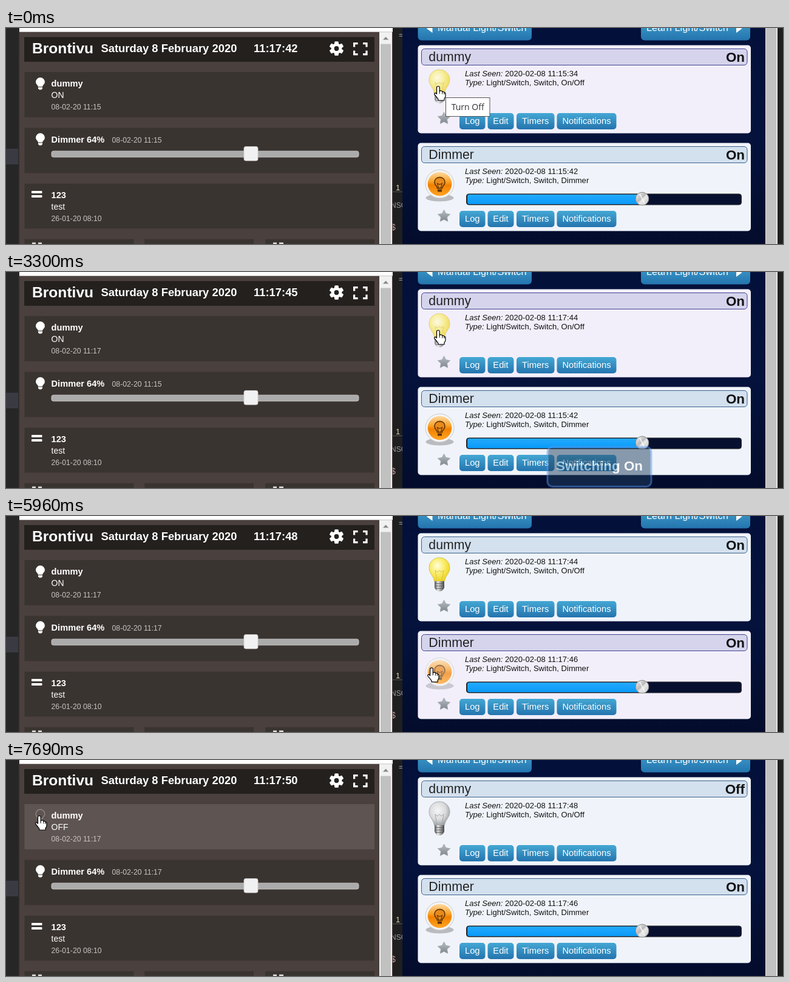
These frames come from a looping animation (1280 by 358 pixels, 8 s). An HTML page:

```html
<!DOCTYPE html>
<html lang="en">
<head>
<meta charset="utf-8">
<title>Switch dashboard</title>
<style>
html, body { margin: 0; width: 100%; height: 100%; overflow: hidden; background: #1e1e1e; }
svg { display: block; width: 100vw; height: 100vh; font-family: "Liberation Sans", Arial, sans-serif; }
.b { font-weight: bold; }
.m { text-anchor: middle; }
.e { text-anchor: end; }
.tip { font-family: "Open Sans", "Noto Sans", sans-serif; }
</style>
</head>
<body>
<svg id="stage" viewBox="0 0 1280 358" xmlns="http://www.w3.org/2000/svg"></svg>
<script>
const LOOP = 8000;

const rect = (x, y, w, h, fill, more = '') =>
  `<rect x="${x}" y="${y}" width="${w}" height="${h}" fill="${fill}" ${more}/>`;
const text = (x, y, size, fill, str, more = '') =>
  `<text x="${x}" y="${y}" font-size="${size}" fill="${fill}" ${more}>${str}</text>`;
const path = (d, fill, more = '') => `<path d="${d}" fill="${fill}" ${more}/>`;
const circle = (x, y, r, fill, more = '') => `<circle cx="${x}" cy="${y}" r="${r}" fill="${fill}" ${more}/>`;
const group = (x, y, body, more = '') => `<g transform="translate(${x} ${y})" ${more}>${body}</g>`;
const gradient = (id, stops, kind = 'linear', more = 'x2="0" y2="1"') =>
  `<${kind}Gradient id="${id}" ${more}>` +
  stops.map(([o, c]) => `<stop offset="${o}" stop-color="${c}"/>`).join('') + `</${kind}Gradient>`;

const defs = '<defs>' +
  gradient('navy', [[0, '#03103a'], [0.5, '#04123c'], [1, '#030c2c']]) +
  gradient('button', [[0, '#44a8d4'], [1, '#2474ae']]) +
  gradient('sliderFill', [[0, '#22aaff'], [1, '#0a9af6']]) +
  gradient('orange', [[0, '#ffd9a0'], [0.4, '#f9a32c'], [0.55, '#f28000'], [1, '#ffa526']]) +
  gradient('grey', [[0, '#d8d8d8'], [0.5, '#979797'], [1, '#c2c2c2']]) +
  gradient('yellow', [[0, '#fffde0'], [0.45, '#fbf07a'], [1, '#efd51c']], 'radial', 'cx=".4" cy=".35" r=".65"') +
  gradient('glass', [[0, '#f6f6f6'], [0.6, '#d8dadb'], [1, '#9b9ea0']], 'radial', 'cx=".42" cy=".38" r=".65"') +
  gradient('base', [[0, '#555'], [0.35, '#e8e8e8'], [1, '#444']], 'linear', 'x2="1" y2="0"') +
  gradient('star', [[0, '#b9bec4'], [1, '#7e858d']]) +
  gradient('knob', [[0, '#f7f7f7'], [0.45, '#b9b9b9'], [0.55, '#e9e9e9'], [1, '#c4c4c4']], 'linear', 'x2="1" y2="1"') +
  '</defs>';

// Left window

const BULB = 'M0 0a7.4 7.4 0 0 1 7.4 7.4c0 4-3.3 4.6-3.8 7.9h-7.2c-.5-3.3-3.8-3.9-3.8-7.9a7.4 7.4 0 0 1 7.4-7.4z';
const smallBulb = (id, x, y) =>
  group(x, y, path(BULB, '#fff') + path('M-3.5 16.2h7v2l-1.8 2h-3.4l-1.8-2z', '#fff'), `id="${id}On"`) +
  group(x, y, path(BULB, 'none', 'stroke="#8b8582" stroke-width="1.5"') +
    path('M-3.2 17h6.4M-2 19.3h4', 'none', 'stroke="#8b8582" stroke-width="1.6"'), `id="${id}Off"`);

const equals = y => rect(42, y, 17.5, 4, '#fff', 'rx="1"') + rect(42, y + 7, 17.5, 4, '#fff', 'rx="1"');

const gear = group(544.5, 34,
  [0, 60, 120].map(a => rect(-3.4, -11.8, 6.8, 23.6, '#fff', `rx="1.5" transform="rotate(${a})"`)).join('') +
  circle(0, 0, 8.8, '#fff') + circle(0, 0, 3.9, '#23201e'));

const expand = path('M573.6 31.5V25.6H579.6M588 25.6H594V31.5M594 37.5V43.6H588M579.6 43.6H573.6V37.5',
  'none', 'stroke="#fff" stroke-width="3.2"');

const ROW = '#3a3431';
const ROW_HOVER = '#5e5452';
const DIM_TEXT = '#c8c3c0';

const leftWindow =
  rect(20, 0, 617, 358, '#4a403d') + rect(20, 0, 2, 358, '#302c2b') +
  rect(22, 0, 615, 6.5, '#fff') +
  rect(30, 15, 577, 41, '#23201e') +
  text(43, 42.3, 24.6, '#fff', 'Brontivu', 'class="b"') +
  text(156.5, 40.3, 18.4, '#fff', 'Saturday 8 February 2020', 'class="b"') +
  text(408, 40.3, 18.4, '#fff', '', 'class="b" id="clock"') +
  gear + expand +
  rect(30.5, 73, 576.5, 75, ROW, 'id="rowDummy"') +
  rect(30.5, 165.5, 576.5, 75, ROW, 'id="rowDimmer"') +
  rect(30.5, 258, 576.5, 74.5, ROW) +
  [30.5, 228, 427].map(x => rect(x, 350, 180, 8, ROW)).join('') +
  rect(43, 355.5, 6, 2.5, '#ddd') + rect(53, 355.5, 6, 2.5, '#ddd') +
  rect(440, 355.5, 6, 2.5, '#ddd') + rect(450, 355.5, 7, 2.5, '#ddd') +
  smallBulb('leftDummy', 56.5, 82) + smallBulb('leftDimmer', 56.5, 174.3) +
  text(74.5, 97.3, 14.65, '#fff', 'dummy', 'class="b"') +
  text(74.5, 116, 14, '#fff', '', 'id="dummyState"') +
  text(74.5, 134.5, 12.25, DIM_TEXT, '', 'id="dummyDate"') +
  text(74.5, 189.7, 14.65, '#fff', 'Dimmer 64%', 'class="b"') +
  text(174.5, 189.5, 12.25, DIM_TEXT, '', 'id="dimmerDate"') +
  rect(75, 204, 506, 10, '#ababab', 'rx="3" stroke="#c4c1bf" stroke-width="1"') +
  rect(392, 196.5, 23, 23.5, '#f1f1f1', 'rx="3" stroke="#d0d0d0" stroke-width=".8"') +
  equals(270) +
  text(74.5, 282, 14.65, '#fff', '123', 'class="b"') +
  text(74.5, 301, 14, '#fff', 'test') +
  text(74.5, 319.5, 12.25, DIM_TEXT, '26-01-20 08:10') +
  rect(615, 6.5, 21, 351.5, '#f1f1f1') + rect(617, 26.5, 17, 332, '#c1c1c1') +
  path('M621 19.5l4.6-5 4.6 5z', '#8a8a8a');

// Right window

const button = (x, y, w, label) =>
  rect(x, y, w, 27, 'url(#button)', 'rx="5"') + text(x + w / 2, y + 18.4, 14.7, '#fff', label, 'class="m"');

const starPoints = Array.from({ length: 10 }, (_, i) => {
  const r = i % 2 ? 5.4 : 10.5, a = i * Math.PI / 5;
  return `${(r * Math.sin(a)).toFixed(1)},${(-r * Math.cos(a)).toFixed(1)}`;
}).join(' ');

const panel = (id, y, name, type) =>
  rect(678.5, y, 548.5, 146, '#f0f4fa', `rx="5" id="${id}Panel"`) +
  rect(684.5, y + 6, 536.5, 27, '#d3e0ee', `rx="5" stroke-width="1" id="${id}Title"`) +
  text(696.3, y + 26.6, 21.3, '#222', name) +
  text(1217, y + 27, 22.4, '#111', '', `class="b e" id="${id}Status"`) +
  text(756, y + 51.2, 13.05, '#111', `<tspan font-style="italic">Last Seen:</tspan> <tspan id="${id}Seen"></tspan>`) +
  text(756, y + 66.2, 13.05, '#111', `<tspan font-style="italic">Type:</tspan> Light/Switch, Switch, ${type}`) +
  group(721.5, y + 121.5, `<polygon points="${starPoints}" fill="url(#star)" stroke="#a4aab0" stroke-width="1" stroke-linejoin="round"/>`) +
  button(747, y + 112.5, 42.5, 'Log') + button(793.5, y + 112.5, 43, 'Edit') +
  button(841, y + 112.5, 62.5, 'Timers') + button(907.5, y + 112.5, 98, 'Notifications');

const GLOBE = 'M0 0c10 0 17 7.5 17 17 0 9-7.5 13-8.5 22h-17c-1-9-8.5-13-8.5-22 0-9.5 7-17 17-17z';
const bigBulb = (id, fill, edge) => group(714, 69,
  path(GLOBE, fill, `stroke="${edge}" stroke-width="1"`) +
  path('M-4 38l-3-17 4 3 3-3 3 3 4-3-3 17', 'none', `stroke="${edge}" stroke-width="1"`) +
  path('M-8 39h16v11q-3 6-8 6t-8-6z', 'url(#base)') +
  path('M-8 43h16M-8 47h16M-7 51h14', 'none', 'stroke="#555" stroke-width="1"'), `id="${id}"`);

const dimIcon = (id, fill, inner) => group(714.5, 258.5,
  '<ellipse cx="0" cy="23" rx="23" ry="6" fill="#777" opacity=".45"/>' +
  circle(0, 0, 23.5, '#f4f4f4', 'stroke="#c9c9c9" stroke-width="1"') + circle(0, 0, 19.8, fill) + inner, `id="${id}"`);

const bulbGlyph =
  path('M0 -11c5.5 0 8.5 4 8.5 8 0 5-4 6-4.5 10h-8c-.5-4-4.500-5-4.500-10 0-4 3-8 8.500-8z', '#e98a1c', 'stroke="#6b3b08" stroke-width="1.8"') +
  path('M-3.500 9h7v4h-7z', '#5b3409') + path('M-2 7l-2-8 4 2 4-2-2 8', 'none', 'stroke="#6b3b08" stroke-width="1.300"');

const knob = circle(1048, 283, 10.8, 'url(#knob)', 'stroke="#8d8d8d" stroke-width="1"') +
  path('M1044 275l8 16', 'none', 'stroke="#fff" stroke-width="2" opacity=".7"');

const rightWindow =
  rect(653, 0, 598, 358, 'url(#navy)') +
  rect(678.5, -20, 187.5, 40.5, 'url(#button)', 'rx="6"') + rect(1046, -20, 180, 40.5, 'url(#button)', 'rx="6"') +
  path('M693 1l9.500 -7v14z', '#fff') + path('M1212.500 1l-9.500 -7v14z', '#fff') +
  text(711, 5.3, 16.4, '#fff', 'Manual Light/Switch') + text(1055, 5.3, 16.4, '#fff', 'Learn Light/Switch') +
  panel('dummy', 28.5, 'dummy', 'On/Off') + panel('dimmer', 190.5, 'Dimmer', 'Dimmer') +
  `<g id="dummyIcon">${bigBulb('bulbOn', 'url(#yellow)', '#d8c24a')}${bigBulb('bulbOff', 'url(#glass)', '#a6a9ab')}</g>` +
  `<g id="dimmerIcon">${dimIcon('dimOn', 'url(#orange)', bulbGlyph)}` +
  dimIcon('dimOff', 'url(#grey)', circle(0, 0, 10, 'none', 'stroke="#ddd" stroke-width="2"')) + '</g>' +
  rect(758.5, 275, 453, 18, '#07112f', 'rx="4" stroke="#333" stroke-width="1"') +
  rect(760, 276, 288, 16, 'url(#sliderFill)', 'rx="3"') + knob +
  rect(1251, 0, 20, 358, '#e4e4e4') + rect(1252, 0, 17, 358, '#c1c1c1');

const desktop =
  rect(0, 0, 1280, 358, '#1f1f20') + rect(0, 0, 20, 358, '#262627') + rect(0, 200, 20, 26, '#3a3a43') +
  rect(636, 271, 17, 1, '#555') +
  text(647, 16, 13, '#aaa', '=') + text(642, 269, 13, '#d7d7b0', '1') +
  text(634, 298, 12, '#9a9a9a', 'NSO') + text(634, 335, 14, '#c9a0a0', '$');

const HAND = 'M-2.500 2Q-2.500-.5 0-.5 2.200-.5 2.200 2V8Q3 6.700 5 7 6.600 7.300 6.800 8.600 9 7.800 10 9.800 12 9.600 12 12V16Q12 18 10 20V23H0V21Q-2 18-6 13.500-7 11-5 10.600-3.600 10.600-2.500 12.500Z';
const ARROW = 'M0 0V17L4 13.500 6.500 19.500 9.500 18.200 7 12.500H12.500Z';
const OUTLINE = 'stroke="#000" stroke-width="1.2" stroke-linejoin="round"';

const overlay =
  `<g id="toast">${rect(892, 290, 171, 65.5, '#204060', 'rx="8" stroke="#5799f2" stroke-width="3"')}` +
  text(977.5, 329.3, 22.4, '#fff', '', 'class="b m" id="toastText"') + '</g>' +
  `<g id="tooltip">${rect(0.5, 0.5, 72.5, 31, '#fff', 'stroke="#555" stroke-width="1"')}` +
  text(36.7, 21, 14, '#333', '', 'class="tip m" id="tooltipText"') + '</g>' +
  `<g id="cursor">${path(HAND, '#fff', OUTLINE + ' id="hand"')}` +
  path('M2.200 8V12M6.800 9V12.500M10 10V13', 'none', 'stroke="#000" stroke-width="1" id="fingers"') +
  path(ARROW, '#fff', OUTLINE + ' id="arrow"') + '</g>';

document.getElementById('stage').innerHTML = defs + desktop + leftWindow + rightWindow + overlay;

// Timeline: each entry holds from its start time on

const TICKS = [0, 730, 1660, 2690, 3690, 4710, 5730, 6750, 7690];
const RIGHT_DUMMY = [[0, 'On', '11:15:34'], [1900, 'Off', '11:17:43'], [2920, 'On', '11:17:44'], [7130, 'Off', '11:17:48']];
const RIGHT_DIMMER = [[0, 'On', '11:15:42'], [4550, 'Off', '11:17:45'], [5410, 'On', '11:17:46']];
const LEFT_DUMMY = [[0, 'On', '11:15'], [1900, 'Off', '11:17'], [2920, 'On', '11:17'], [7040, 'Off', '11:17']];
const LEFT_DIMMER = [[0, 'On', '11:15'], [4550, 'Off', '11:17'], [5410, 'On', '11:17']];
const TOASTS = [[0, ''], [1905, 'Off'], [2920, ''], [3000, 'On'], [4100, ''], [4520, 'Off'], [5410, 'On', 'shown'], [5560, '']];
const TOOLTIPS = [[0, 'Turn Off', 724, 115], [1660, ''], [4940, 'Turn On', 726.5, 271], [5410, '']];
const POINTER = [[0, 712, 97], [3720, 712, 97], [4310, 715, 254], [5900, 715, 254],
  [6490, 185, 181], [6750, 120, 152], [7040, 55, 93], [LOOP, 55, 93]];

const at = (table, t) => table.findLast(step => step[0] <= t);
const swing = p => 0.5 - Math.cos(Math.PI * Math.min(1, p)) / 2;
const inside = (x, y, x0, y0, x1, y1) => x >= x0 && x <= x1 && y >= y0 && y <= y1;

function pointerAt(t) {
  const i = POINTER.findIndex(p => p[0] > t);
  const [t0, x0, y0] = POINTER[i - 1], [t1, x1, y1] = POINTER[i];
  const k = swing((t - t0) / (t1 - t0));
  return [x0 + (x1 - x0) * k, y0 + (y1 - y0) * k];
}

const el = {};
document.querySelectorAll('#stage [id]').forEach(node => { el[node.id] = node; });
const say = (id, str) => { if (el[id].textContent !== str) el[id].textContent = str; };
const show = (id, on) => { el[id].style.display = on ? '' : 'none'; };
const pair = (on, off, state) => { show(on, state === 'On'); show(off, state === 'Off'); };

function drawPanel(id, [, status, seen], hover, overIcon) {
  say(id + 'Status', status);
  say(id + 'Seen', '2020-02-08 ' + seen);
  el[id + 'Panel'].setAttribute('fill', hover ? '#f2effa' : '#f0f4fa');
  el[id + 'Title'].setAttribute('fill', hover ? '#d5d4ec' : '#d3e0ee');
  el[id + 'Title'].setAttribute('stroke', hover ? '#40408f' : '#3a618c');
  el[id + 'Icon'].setAttribute('opacity', overIcon ? 0.7 : 1);
}

function render(t) {
  say('clock', '11:17:' + (41 + TICKS.filter(tick => tick <= t).length));

  const [x, y] = pointerAt(t);
  const onDummyIcon = inside(x, y, 690, 66, 738, 128);
  const onDimmerIcon = inside(x, y, 690, 235, 738, 285);
  const onDummyRow = inside(x, y, 30, 73, 607, 148);
  const onDimmerRow = inside(x, y, 30, 165, 607, 240);
  const link = onDummyIcon || onDimmerIcon || onDummyRow || onDimmerRow;
  el.cursor.setAttribute('transform', `translate(${x.toFixed(1)} ${y.toFixed(1)})`);
  show('hand', link);
  show('fingers', link);
  show('arrow', !link);

  const dummy = at(RIGHT_DUMMY, t), dimmer = at(RIGHT_DIMMER, t);
  drawPanel('dummy', dummy, inside(x, y, 678, 28, 1227, 175), onDummyIcon);
  drawPanel('dimmer', dimmer, inside(x, y, 678, 190, 1227, 336), onDimmerIcon);
  pair('bulbOn', 'bulbOff', dummy[1]);
  pair('dimOn', 'dimOff', dimmer[1]);

  const leftDummy = at(LEFT_DUMMY, t), leftDimmer = at(LEFT_DIMMER, t);
  pair('leftDummyOn', 'leftDummyOff', leftDummy[1]);
  pair('leftDimmerOn', 'leftDimmerOff', leftDimmer[1]);
  say('dummyState', leftDummy[1].toUpperCase());
  say('dummyDate', '08-02-20 ' + leftDummy[2]);
  say('dimmerDate', '08-02-20 ' + leftDimmer[2]);
  el.rowDummy.setAttribute('fill', onDummyRow ? ROW_HOVER : ROW);
  el.rowDimmer.setAttribute('fill', onDimmerRow ? ROW_HOVER : ROW);

  const [start, state, shown] = at(TOASTS, t);
  say('toastText', 'Switching ' + state);
  el.toast.setAttribute('opacity', !state ? 0 : shown ? 1 : swing((t - start) / 600));

  const [, tip, tipX, tipY] = at(TOOLTIPS, t);
  show('tooltip', tip);
  say('tooltipText', tip);
  if (tip) el.tooltip.setAttribute('transform', `translate(${tipX} ${tipY})`);
}

const begin = performance.now();
function tick() {
  render((performance.now() - begin) % LOOP);
  requestAnimationFrame(tick);
}
tick();
</script>
</body>
</html>
```
